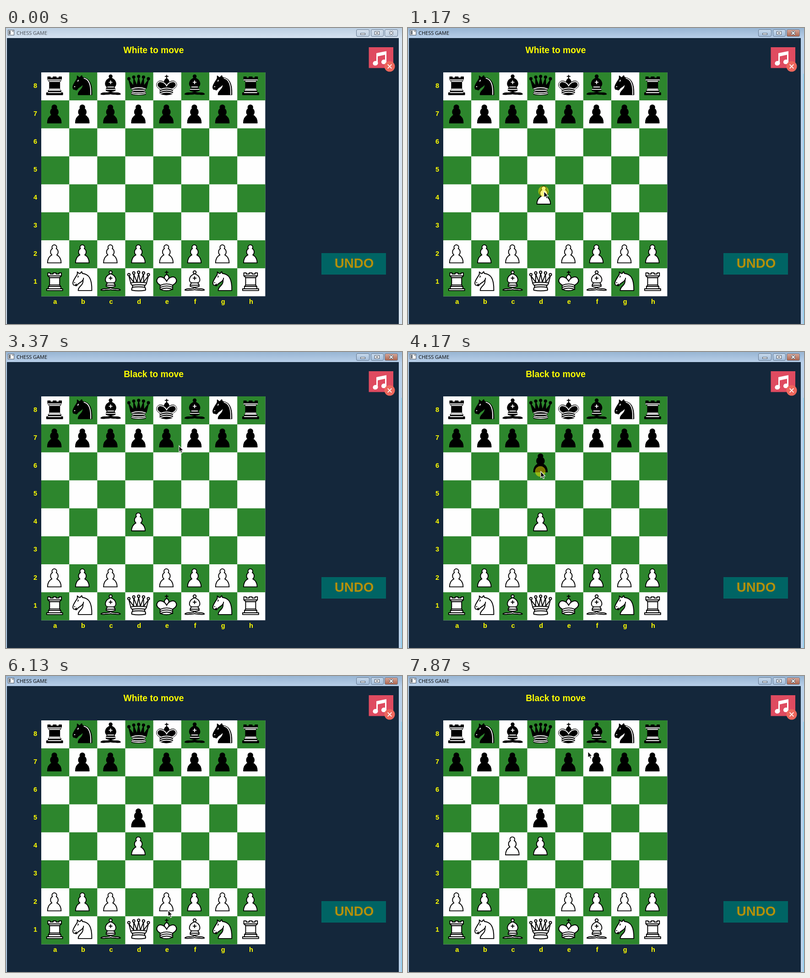
Write an HTML page with a canvas that moves like this. It is 865 px wide and 647 px high and loops after 8000 ms.

```html
<!DOCTYPE html>
<html lang="en">
<head>
<meta charset="utf-8">
<title>Chess game</title>
<style>
html, body { margin: 0; width: 100%; height: 100%; overflow: hidden; background: #14273b; }
canvas { display: block; width: 865px; height: 647px; }
</style>
</head>
<body>
<canvas id="stage" width="865" height="647"></canvas>
<script>
const ctx = document.getElementById('stage').getContext('2d');
const LOOP = 8000, STEP = 78.96, CELL = 61.17, LEFT = 77, TOP = 97, SCALE = 1.29;
const YELLOW = '#ffff00', GREY = '#4b5563', BOLD = '"Liberation Sans", Arial, sans-serif';
const range = n => [...Array(n).keys()];

// Outline parts on a 45-unit square, mirrored around x = 22.5 where possible.
const slab = (top, y1, low, y2) => `M${22.5 - top} ${y1}H${22.5 + top}L${22.5 + low} ${y2}H${22.5 - low}z`;
const band = (y, half, bow = 0) => `M${22.5 - half} ${y}q${half} ${-bow} ${2 * half} 0`;
const ball = (x, y, r) => `M${x + r} ${y}a${r} ${r} 0 1 1 ${-2 * r} 0a${r} ${r} 0 1 1 ${2 * r} 0z`;
const crownTips = range(5).map(i => [6 + 8.25 * i, 12 - 4 * Math.sin(Math.PI * i / 4)]);
const crown = 'M9 26' + crownTips.map(([x, y], i) => `L${x} ${y + 2}` + (i < 4 ? `L${14 + 5.7 * i} 24.7` : '')).join('') + 'L36 26z';
const kingBands = [30, 33.5, 37].map(y => band(y, 10.5, 4.5)).join('');
const bishopLines = band(26, 5) + band(30, 7.5) + band(18, 2.5) + 'M22.5 15.5V20.5';
const knightDots = 'M8.7 25.5H9.3M15.2 14.6L14.4 16.2';

// body: filled parts; dark: lines on white pieces; light: lines on black ones
const SHAPES = {
  p: { body: ['M18.8 15.4A4 4 0 1 1 25.2 15.4A6.5 6.5 0 0 1 26.1 26Q33.5 30 33.5 39.5H10.5Q10.5 30 17.9 26A6.5 6.5 0 0 1 18.8 15.4z'] },
  r: {
    body: [slab(13.5, 36, 13.5, 39), slab(10.5, 32, 10.5, 36), slab(8.5, 29.5, 10, 32),
      slab(8.5, 17, 8.5, 29.5), slab(11.5, 14, 8.5, 17), 'M11 14V9h4v2h5v-2h5v2h5v-2h4v5z'],
    light: band(35.5, 10.5) + band(31.5, 9.5) + band(29.5, 8.5) + band(16.5, 8.5) + band(14, 11.5)
  },
  n: {
    body: ['M22 10C32.5 11 38.5 18 38 39H15C15 30 25 32.5 23 18',
      'M24 18C24.4 21 18.5 25.4 16 27C13 29 13.2 31.3 11 31L12 28L10 30Q6 31 6 26Q6 23 12 14Q14 12 13.5 7.5L16.5 10H18.5Q19.3 8 21 7L22 10'],
    dark: knightDots,
    light: knightDots + 'M25 11.2C33 13 36.8 23 36.2 38.8'
  },
  b: {
    body: ['M6 38Q8 35.5 14 36Q20 36 22.5 34Q25 36 31 36Q37 35.5 39 38Q37 39.3 31 38.3Q25 38.5 22.5 37.5Q20 38.5 14 38.3Q8 39.3 6 38z',
      'M15 32Q14.5 28 17.5 26C12 24.5 11.5 14.5 22.5 10.5C33.5 14.5 33 24.5 27.5 26Q30.5 28 30 32Q22.5 35 15 32z', ball(22.5, 8, 2.5)],
    dark: bishopLines,
    light: bishopLines
  },
  q: {
    body: [...crownTips.map(([x, y]) => ball(x, y, 2)), crown,
      'M9 26Q22.5 24 36 26Q36 28 33.5 30Q32 31.5 33 33.5Q35 36 34 38.5Q22.5 40.5 11 38.5Q10 36 12 33.5Q13 31.5 11.5 30Q9 28 9 26z'],
    dark: band(30, 11, 1.5) + band(33.5, 10.5, 1.5),
    light: band(29, 11.5, 3.6) + band(31.5, 10) + band(34.5, 11, -3) + band(37, 11.5, -3)
  },
  k: {
    body: [band(8, 2.5) + 'M22.5 11.6V6', 'M22.5 25Q17 17 19.5 14.5Q22.5 9.5 25.5 14.5Q28 17 22.5 25z',
      'M11.5 37V29.7Q3.5 25 6.5 19.5C10 13 19 16 22.5 23.5C26 16 35 13 38.5 19.5Q41.5 25 32.5 30V37Q22 41.5 11.5 37z'],
    dark: kingBands,
    light: kingBands + 'M12 29Q4.5 25 7 20C10 14 20 18 22.5 24.5C25 18 35 14 38 20Q40.5 25 32 29.5'
  }
};
for (const s of Object.values(SHAPES)) {
  s.body = s.body.map(d => new Path2D(d));
  s.dark = new Path2D(s.dark);
  s.light = new Path2D(s.light || '');
}

// Pointer glides: first step, last step, end point
const START = [291, 492];
const GLIDES = [
  [4, 11, 297, 357], [17, 23, 290, 192], [24, 26, 327, 181], [34, 36, 315, 180],
  [37, 39, 378, 205], [40, 43, 290, 190], [44, 53, 290, 312], [56, 62, 359, 450],
  [62, 65, 362, 524], [66, 69, 354, 512], [77, 81, 212, 484], [81, 87, 225, 363],
  [90, 92, 73, 380], [92, 96, 393, 165]
];
// Pawn moves, with the steps of press, release and the change of turn
const MOVES = [
  { side: 'w', col: 3, from: 6, to: 4, press: 4, drop: 14, turn: 18 },
  { side: 'b', col: 3, from: 1, to: 3, press: 44, drop: 56, turn: 61 },
  { side: 'w', col: 2, from: 6, to: 4, press: 81, drop: 89, turn: 91 }
];

function pointer(k) {
  let [x, y] = START;
  for (const [a, b, tx, ty] of GLIDES) {
    if (k <= a) break;
    const u = Math.min(1, (k - a) / (b - a)), e = u * u * (3 - 2 * u);
    x += (tx - x) * e;
    y += (ty - y) * e;
  }
  return [Math.round(x), Math.round(y)];
}

function rect(x, y, w, h, color) {
  ctx.fillStyle = color;
  ctx.fillRect(x, y, w, h);
}

function disc(x, y, r, color) {
  ctx.fillStyle = color;
  ctx.beginPath();
  ctx.arc(x, y, r, 0, 7);
  ctx.fill();
}

function text(s, x, y, font, color, align = 'center') {
  ctx.font = font;
  ctx.fillStyle = color;
  ctx.textAlign = align;
  ctx.fillText(s, x, y);
}

function cross(x, y, r, color, width) {
  ctx.strokeStyle = color;
  ctx.lineWidth = width;
  ctx.stroke(new Path2D(`M${x - r} ${y - r}l${2 * r} ${2 * r}m0 ${-2 * r}l${-2 * r} ${2 * r}`));
}

function fade(y, h, top, low) {
  const g = ctx.createLinearGradient(0, y, 0, y + h);
  g.addColorStop(0, top);
  g.addColorStop(1, low);
  return g;
}

function piece(kind, side, x, y) {
  const s = SHAPES[kind], white = side === 'w';
  ctx.save();
  ctx.translate(x, y);
  ctx.scale(SCALE, SCALE);
  ctx.lineCap = ctx.lineJoin = 'round';
  ctx.lineWidth = 1.5;
  ctx.fillStyle = white ? '#fff' : '#000';
  ctx.strokeStyle = '#000';
  for (const p of s.body) { ctx.fill(p); ctx.stroke(p); }
  if (!white) ctx.strokeStyle = '#fff';
  ctx.stroke(white ? s.dark : s.light);
  ctx.restore();
}

const placed = (kind, side, col, row) => piece(kind, side, LEFT + .2 + CELL * col, TOP - 1.6 + CELL * row);

function button(x, w, top, low) {
  ctx.beginPath();
  ctx.roundRect(x + .5, 3.5, w, 15, 2.5);
  ctx.fillStyle = fade(3, 15, top, low);
  ctx.fill();
  ctx.strokeStyle = '#64788f';
  ctx.lineWidth = 1;
  ctx.stroke();
}

function outlined(x, y, w, h) {
  rect(x, y, w, h, GREY);
  rect(x + 1, y + 1, w - 2, h - 2, '#fff');
}

function windowFrame(active) {
  rect(0, 0, 865, 647, active ? '#b9d1ea' : '#d7e4f2');
  rect(0, 0, 865, 22, active ? fade(0, 22, '#98b5d3', '#b8cfe9') : fade(0, 22, '#bccfe2', '#d5e2f0'));
  if (active) rect(863, 100, 2, 547, '#8fd0f0');
  rect(2, 22, 856, 625, '#14273b');

  outlined(4, 4, 14, 12);
  rect(6, 6, 4, 8, '#6d747c');
  rect(14, 6, 2, 2, GREY);
  text('CHESS GAME', 23, 15, '11px "Open Sans", "Noto Sans", sans-serif', active ? '#0a0a0a' : '#4a4f55', 'left');

  const top = active ? '#c9daec' : '#d3dfec', low = active ? '#a5bfdc' : '#c3d3e4';
  button(765, 28, top, low);
  button(797, 27, top, low);
  button(827, 28, active ? '#d8aa9d' : top, active ? '#ad6650' : low);
  outlined(774, 11, 11, 4);
  outlined(805, 7, 11, 8);
  rect(808, 10, 5, 2, GREY);
  cross(841.5, 11, 3.6, GREY, 4);
  cross(841.5, 11, 3.4, '#fff', 2);
}

function musicButton() {
  rect(792.5, 42, 53.5, 45.5, '#df4b60');
  ctx.fillStyle = '#fff';
  ctx.fill(new Path2D('M809 55L831 50.5V74H828V58.5L812 62V77H809z'));
  for (const [x, y] of [[807, 77], [825.5, 74]]) {
    ctx.beginPath();
    ctx.ellipse(x, y, 5.7, 5, -.35, 0, 7);
    ctx.fill();
  }
  disc(838, 84, 11.5, '#ee675c');
  cross(838, 84, 4.3, '#fff', 1.7);
}

function board(k) {
  rect(LEFT, TOP, 8 * CELL, 8 * CELL, '#fefefe');
  for (const r of range(8))
    for (const c of range(8))
      if ((r + c) % 2) rect(LEFT + c * CELL, TOP + r * CELL, CELL, CELL, '#2d862d');

  const font = 'bold 14.5px ' + BOLD;
  for (const i of range(8)) {
    text(8 - i, 64, 130.5 + CELL * i, font, YELLOW);
    text('abcdefgh'[i], 107.2 + CELL * i, 603, font, YELLOW);
    placed('rnbqkbnr'[i], 'b', i, 0);
    placed('rnbqkbnr'[i], 'w', i, 7);
    for (const [side, row] of [['b', 1], ['w', 6]]) {
      const m = MOVES.find(m => m.side === side && m.col === i);
      if (!m || k < m.press) placed('p', side, i, row);
      else if (k >= m.drop) placed('p', side, i, m.to);
    }
  }
}

function cursor(x, y) {
  const arrow = new Path2D(`M${x} ${y}v13.5l3.2 -2.7l2.3 5.2l2.2 -1l-2.2 -5h4z`);
  ctx.fillStyle = '#000';
  ctx.fill(arrow);
  ctx.strokeStyle = '#fff';
  ctx.lineWidth = 1.1;
  ctx.stroke(arrow);
}

function draw(t) {
  const k = Math.floor((t - 280) / STEP);
  windowFrame(k >= MOVES[0].press);
  musicButton();
  const turns = MOVES.filter(m => k >= m.turn).length;
  text((turns % 2 ? 'Black' : 'White') + ' to move', 322.5, 55, 'bold 19.3px ' + BOLD, YELLOW);
  rect(689, 492, 141, 47, '#006464');
  text('UNDO', 760.5, 524, 'bold 29px ' + BOLD, '#b4900a');
  board(k);
  if (k < 0) return;

  const [x, y] = pointer(k);
  const held = MOVES.find(m => k >= m.press && k < m.drop);
  if (held) {
    // The held pawn trails the pointer by one step.
    const [px, py] = pointer(k - 1);
    piece('p', held.side, px - 29, py - 30);
    disc(x - 1, y, 11.5, 'rgba(250,236,0,0.5)');
  }
  cursor(x, y);
}

const start = performance.now();
function frame() {
  draw((performance.now() - start) % LOOP);
  requestAnimationFrame(frame);
}
frame();
</script>
</body>
</html>
```
